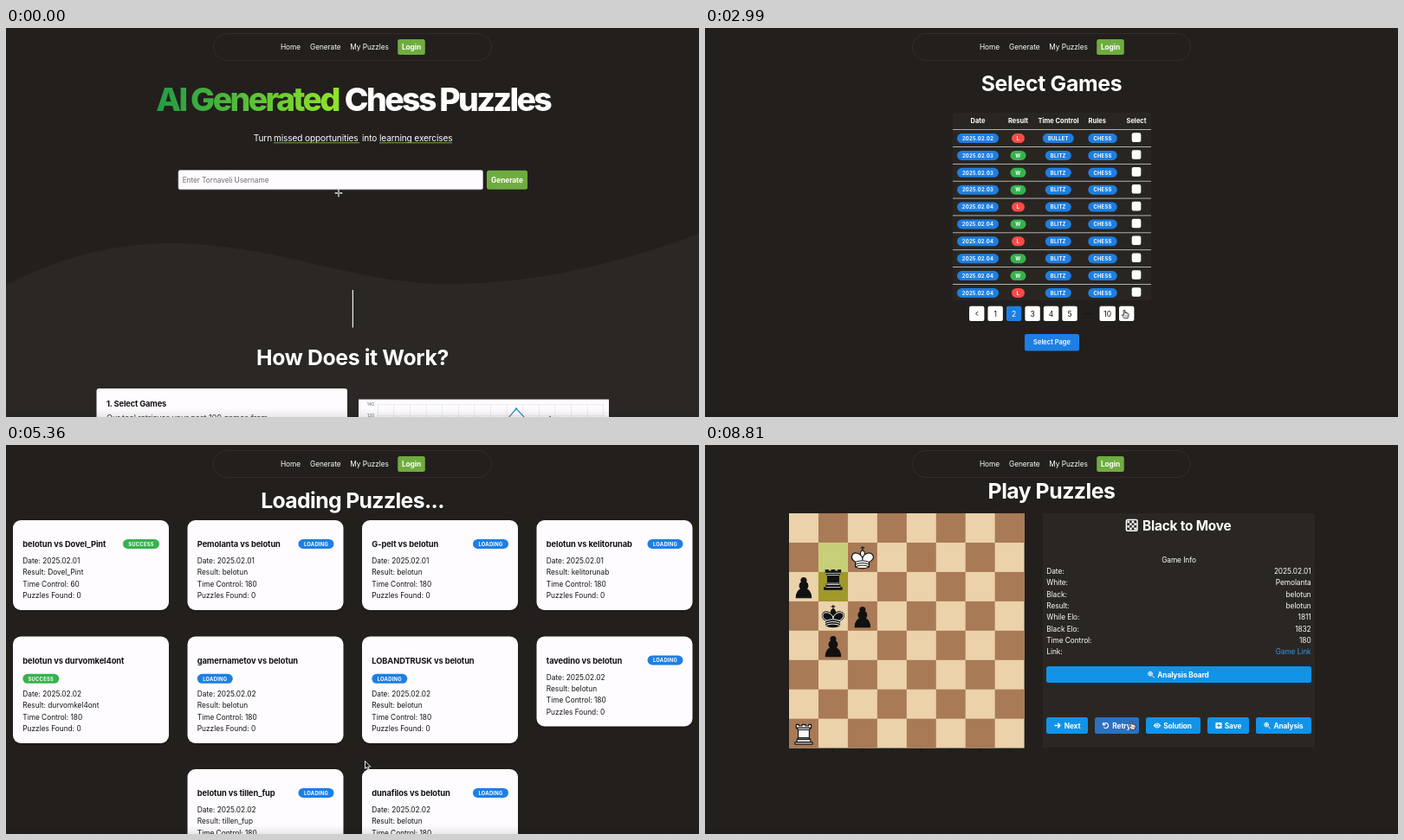
An HTML page for the animation above (8840 ms loop, 800 by 450 pixels).

```html
<!DOCTYPE html>
<html lang="en">
<head>
<meta charset="utf-8">
<title>Chess puzzle generator</title>
<style>
html,body{margin:0;width:100%;height:100%;overflow:hidden;background:#221f1d}
svg{display:block;width:800px;height:450px;font-family:Inter,"Open Sans",sans-serif}
text{white-space:pre}
</style>
</head>
<body>
<svg viewBox="0 0 800 450">
  <defs>
    <linearGradient id="lime"><stop stop-color="#219b45"/><stop offset="1" stop-color="#90e52b"/></linearGradient>
    <linearGradient id="teal" x2="1" y2=".4"><stop offset=".1" stop-color="#1d7fe3"/><stop offset="1" stop-color="#62a3ae"/></linearGradient>
    <linearGradient id="fade" x2="0" y2="1"><stop stop-opacity="0"/><stop offset="1" stop-opacity=".08"/></linearGradient>
  </defs>
  <rect width="800" height="450" fill="#221f1d"/>
  <g id="scene"></g>
  <g id="nav"></g>
  <rect y="440" width="800" height="10" fill="url(#fade)"/>
  <g id="mouse"></g>
</svg>
<script>
const LOOP = 8840;
const BLUE = '#1d7fe3', GREEN = '#37b24d', RED = '#fa4b4b', GRASS = '#6fac3f', SKY = '#1193e8';
const ME = 'belotun';
const $ = id => document.getElementById(id);
const range = n => [...Array(n).keys()];
const each = (list, fn) => list.map(fn).join('');

const box = (x, y, w, h, fill, r = 0, more = '') =>
  `<rect x="${x}" y="${y}" width="${w}" height="${h}" rx="${r}" fill="${fill}" ${more}/>`;
const stroke = (d, color, width = 1, fill = 'none') =>
  `<path d="${d}" fill="${fill}" stroke="${color}" stroke-width="${width}" stroke-linecap="round" stroke-linejoin="round"/>`;
const put = (x, y, inner, scale = 1) => `<g transform="translate(${x} ${y}) scale(${scale})">${inner}</g>`;
const text = (x, y, s, size = 8.3, fill = '#fff', weight = 400, anchor = 'start', gap = -.06) =>
  `<text x="${x}" y="${y}" font-size="${size}" fill="${fill}" font-weight="${weight}" text-anchor="${anchor}" letter-spacing="${gap}">${s}</text>`;
const mid = (x, y, s, size, fill, weight = 400, gap) => text(x, y, s, size, fill, weight, 'middle', gap);
const badge = (cx, cy, w, s, fill) =>
  box(cx - w / 2, cy - 5.5, w, 11, fill, 5.5) + mid(cx, cy + 2.2, s, 5.8, '#fff', 700, .28);
const heading = (y, s, gap) => mid(400, y, s, 24.8, '#fff', 700, gap);

$('nav').innerHTML =
  box(239.5, 6.5, 321, 31, 'none', 15.5, 'stroke="#34322f" stroke-width=".8"') +
  text(317, 25, 'Home') + text(351, 25, 'Generate') + text(397.3, 25, 'My Puzzles') +
  box(452.2, 13, 31.6, 18, GRASS, 2.5) + mid(468, 25, 'Login', 8.3, '#fff', 700, -.1);

/* landing page */
function home(t) {
  const focus = t > 380;
  const typed = ME.slice(0, Math.max(0, Math.floor((t - 450) / 75)));
  const tagline = (x, s) => text(x, 131, s, 10.1, '#fff', 400, 'start', -.12);
  return `<path d="M0 297C70 262 130 249 190 249C310 249 400 296 510 296C620 296 720 268 800 238V450H0Z" fill="#2a2724"/>` +
    mid(278.5, 95.5, 'AI Generated', 37.4, 'url(#lime)', 800, -2.6) +
    mid(509.5, 95.5, 'Chess Puzzles', 37.4, '#fff', 800, -2.6) +
    tagline(285.8, 'Turn') + tagline(309, 'missed opportunities') +
    tagline(411, 'into') + tagline(431, 'learning exercises') +
    box(309, 132.3, 99, 1, GRASS) + box(431, 132.3, 84, 1, GRASS) +
    box(199, 164.5, 351.5, 22.3, '#fefcff', 2, `stroke="${focus ? '#5aa070' : '#b9bcc4'}" stroke-width="${focus ? 1.1 : .6}"`) +
    (typed ? text(203.7, 178.6, typed, 8.3, '#111') : text(203.7, 178.6, 'Enter Tornaveli Username', 8.3, '#6c6c70')) +
    box(555, 164.7, 47, 22, GRASS, 2.5) + mid(578.5, 178.6, 'Generate', 8.3, '#fff', 700) +
    box(399.8, 303, 1.2, 43.5, '#eee') + heading(390, 'How Does it Work?', -.36) +
    box(104.5, 417, 289.5, 50, '#fefcff', 3) +
    text(116, 438, '1. Select Games', 9.3, '#111', 700, 'start', -.15) +
    text(116, 454, 'Our tool retrieves your past 100 games from', 9.1, '#333') +
    box(407, 429.6, 289, 40, '#fefcff') +
    each(range(15), i => box(429 + i * 18.6, 435, .5, 15, '#d9d9dd')) +
    each([435, 448], y => box(429, y, 261, .5, '#d9d9dd')) +
    text(425, 437, '140', 5, '#666', 400, 'end') + text(425, 450, '120', 5, '#666', 400, 'end') +
    stroke('M579 452L589 440.5L600 452', '#2a8cc8', 1.2) +
    '<circle cx="589" cy="440.5" r="1.2" fill="#2a8cc8"/><circle cx="628" cy="450" r="1.2" fill="#777"/>';
}

/* game table */
const PAGES = [
  { days: '1111222222', results: 'WWLLWWWLWW' },
  { days: '2333444444', results: 'LWWWLWLWWL' }
];
function games(t) {
  const page = t > 2450 && t < 3400 ? 1 : 0, picked = t > 4080;
  const { days, results } = PAGES[page];
  const row = i => {
    const y = 127.6 + i * 19.87, won = results[i] === 'W';
    return box(286, y - 10.4, 229, .8, '#d4d3d1') +
      badge(315, y, 48, '2025.02.0' + days[i], BLUE) +
      badge(361.5, y, won ? 18 : 15, results[i], won ? GREEN : RED) +
      badge(407.8, y, i ? 30 : 36, i ? 'BLITZ' : 'BULLET', BLUE) +
      badge(459, y, 33.5, 'CHESS', BLUE) +
      box(492.7, y - 6.3, 10.6, 10.6, picked ? BLUE : '#fff', 2) +
      (picked ? stroke(`M495.4 ${y - 1}l1.9 1.9l3.5 -3.7`, '#fff', 1.4) : '');
  };
  const key = (x, s, n) => {
    const on = n === page + 1, off = s === '‹' && !page;
    const ink = on ? '#fff' : '#111', w = s === '10' ? 18.5 : 17.4;
    const d = s === '‹' ? 'M1 -2l-2 2l2 2' : 'M-1 -2l2 2l-2 2';
    return box(x - w / 2, 321.8, w, 17.2, on ? BLUE : off ? '#696867' : '#fff', 2) +
      (n ? mid(x, 333.5, s, 8.5, ink) : put(x, 330.4, stroke(d, ink, 1)));
  };
  const shift = picked ? -30.7 : 0;
  return heading(73, 'Select Games', -.3) + box(286, 98, 229, 217, '#292622', 2) +
    each([[315, 'Date'], [361.5, 'Result'], [408, 'Time Control'], [452.7, 'Rules'], [498, 'Select']],
      ([x, s]) => mid(x, 110.2, s, 7.5, '#fff', 700, 0)) +
    each(range(10), row) +
    each(['‹', '1', '2', '3', '4', '5'], (s, i) => key(313.7 + i * 21.47, s, i)) +
    each([438.7, 442.3, 445.9], x => `<circle cx="${x}" cy="330.4" r=".8" fill="#0c0b0a"/>`) +
    key(464.7, '10', 10) + key(486.7, '›', 0) +
    box(369 + shift, 354, 63, 19.5, BLUE, 2) + mid(400.5 + shift, 366.4, 'Select Page', 7.5, '#fff', 600, 0) +
    (picked ? box(414, 354, 48.3, 19.5, 'url(#teal)', 2) + mid(438.2, 366.4, 'Analyze', 7.5, '#fff', 600, 0) : '');
}

/* loading cards: opponent, column, top, plays first, speed, done at, found, winner is me */
const CARDS = [
  ['Dovel_Pint', 0, 87, 1, 60, 5100, 0, 0],
  ['Pemolanta', 1, 87, 0, 180, 5900, 1, 1],
  ['G-pelt', 2, 87, 0, 180, 5600, 0, 1],
  ['kelitorunab', 3, 87, 1, 180, 6500, 2, 0],
  ['durvomkel4ont', 0, 221.5, 1, 180, 5250, 0, 0],
  ['gamernametov', 1, 221.5, 0, 180, 5750, 0, 1],
  ['LOBANDTRUSK', 2, 221.5, 0, 180, 6000, 0, 1],
  ['tavedino', 3, 221.5, 0, 180, 6250, 0, 1],
  ['tillen_fup', 1, 375, 1, 180, 7000, 0, 0],
  ['dunafilos', 2, 375, 0, 180, 6330, 0, 1]
];
function loading(t) {
  return heading(73, 'Loading Puzzles...', -.65) + each(CARDS, ([name, col, y, first, speed, done, found, won], i) => {
    const x = 8 + col * 201.5, wrap = i > 3 && i < 7, ok = t > done;
    const w = ok ? 42 : 41, drop = wrap ? 19.5 : 0;
    const lines = ['Date: 2025.02.0' + (i < 4 ? 1 : 2), 'Result: ' + (won ? ME : name),
      'Time Control: ' + speed, 'Puzzles Found: ' + (ok ? found : 0)];
    return box(x - .5, y + 2, 181, 104 + drop, '#191715', 9, 'opacity=".5"') +
      box(x, y, 180, 104 + drop, '#fefcff', 9) +
      text(x + 11.3, y + 31, first ? `${ME} vs ${name}` : `${name} vs ${ME}`, 9.3, '#111', 700, 'start', -.1) +
      badge(wrap ? x + 11.3 + w / 2 : x + 169 - w / 2, y + (wrap ? 48.8 : 27.4), w, ok ? 'SUCCESS' : 'LOADING', ok ? GREEN : BLUE) +
      each(lines, (s, n) => text(x + 11.3, y + 50 + drop + n * 13.35, s, 8.3, '#111', 400, 'start', 0));
  });
}

/* chess pieces on a 45 unit square */
const FOOT = 'M11.5 30c5.5-3 15.5-3 21 0m-21 3.5c5.5-3 15.5-3 21 0m-21 3.5c5.5-3 15.5-3 21 0';
const INK = '#111', PAPER = '#fcfaf8';
const pawn = stroke('M22.5 9c-2.2 0-4 1.8-4 4 0 .9.3 1.7.8 2.4C17.3 16.5 16 18.6 16 21c0 2 .9 3.8 2.4 5C15.4 27 11 31.6 11 39.5h23c0-7.9-4.4-12.5-7.4-13.5 1.5-1.2 2.4-3 2.4-5 0-2.4-1.3-4.5-3.3-5.6.5-.7.8-1.5.8-2.4 0-2.2-1.8-4-4-4z', INK, 1.5, INK);
const rook = (fill, line) =>
  stroke('M9 39h27v-3H9zM12 36v-4h21v4zM12.5 32l1.5-2.5h17l1.5 2.5zM14 29.5V17h17v12.5zM14 17l-3-3h23l-3 3zM11 14V9h4v2h5V9h5v2h5V9h4v5z', INK, 1.5, fill) +
  stroke('M12 35.5h21M13 31.5h19M14 29.5h17M14 17h17M11 14h23', line, 1);
const king = (fill, line) =>
  stroke('M22.5 11.6V6M20 8h5', INK, 1.5) +
  stroke('M22.5 25s4.5-7.5 3-10.5c0 0-1-2.5-3-2.5s-3 2.5-3 2.5c-1.5 3 3 10.5 3 10.5', INK, 1.5, fill) +
  stroke('M11.5 37c5.5 3.5 15.5 3.5 21 0v-7s9-4.5 6-10.5c-4-6.5-13.5-3.5-16 4V27v-3.5c-3.5-7.5-13-10.5-16-4-3 6 5 10 5 10z', INK, 1.5, fill) +
  stroke(FOOT + (fill === INK ? 'M32 29.5s8.5-4 6-9.6C34.2 14 25 18 22.5 24.5v2.1v-2.1C20 18 10 14 7 19.9c-2.5 5.6 4.9 9 4.9 9' : ''), line, 1.3);

const CELL = 33.95, BX = 97, BY = 79;
const on = (c, r, art) => put(BX + c * CELL, BY + r * CELL, art, CELL / 45);
const ramp = (t, a, b) => Math.min(1, Math.max(0, (t - a) / (b - a)));

const lens = stroke('M1.2 1.2L3.4 3.4M1.5 -.9A2.4 2.4 0 1 1 -3.3 -.9A2.4 2.4 0 1 1 1.5 -.9M-2.1 -.9h2.4M-.9 -2.1v2.4', '#fff', 1);
const icons = {
  Next: stroke('M-3 0h6M.6 -2.5L3 0L.6 2.5', '#fff', 1.3),
  Retry: stroke('M-3 -3v2.4h2.4M-2.8 -.8A3 3 0 1 1 -1.8 2.4', '#fff', 1.2),
  Solution: '<path d="M-4.3 0Q0 -6 4.3 0Q0 6 -4.3 0Z" fill="#fff"/><circle r="1.7" fill="none" stroke="#1193e8" stroke-width=".9"/>',
  Save: box(-3.6, -3.6, 7.2, 7.2, '#fff', 1) + stroke('M-1.8 0h3.6M0 -1.8v3.6', SKY, 1.1),
  Analysis: lens
};
const BUTTONS = [['Next', 394, 48, 407, 424], ['Retry', 450, 51, 462.5, 481], ['Solution', 509, 63, 522, 545.5],
  ['Save', 580, 48, 593, 609.5], ['Analysis', 636, 64, 649, 673.5]];
const INFO = [['Date:', '2025.02.01'], ['White:', 'Pemolanta'], ['Black:', ME], ['Result:', ME],
  ['While Elo:', '1811'], ['Black Elo:', '1832'], ['Time Control:', '180'], ['Link:', 'Game Link']];

function play(t) {
  const rank = 2 - ramp(t, 7850, 8050) + ramp(t, 8705, 8850);
  const moved = t > 8050;
  return heading(62, 'Play Puzzles', -.5) +
    box(BX, BY, CELL * 8, CELL * 8, '#ebd2aa') +
    each(range(64), i => {
      const c = i % 8, r = i >> 3;
      return (c + r) % 2 ? box(BX + c * CELL, BY + r * CELL, CELL, CELL, '#a97a56') : '';
    }) +
    (moved ? box(BX + CELL, BY + CELL, CELL, CELL, '#c8cf79') + box(BX + CELL, BY + 2 * CELL, CELL, CELL, '#a09829') : '') +
    each([...'ABCDEFGH'], (s, i) => mid(BX + (i + .5) * CELL, 355, s, 4.5, '#151412') +
      mid(372, BY + (i + .5) * CELL + 2, 8 - i, 4.5, '#191816')) +
    on(2, 1, king(PAPER, INK)) + on(0, 2, pawn) + on(1, 3, king(INK, '#fff')) + on(2, 3, pawn) +
    on(1, 4, pawn) + on(0, 7, rook(PAPER, INK)) + on(1, rank, rook(INK, '#fff')) +
    box(390, 79, 314, 271, '#2a2723') +
    box(486.4, 86.6, 12.6, 12.6, 'none', 1.5, 'stroke="#fff" stroke-width="1.5"') +
    each(range(16), i => (i + (i >> 2)) % 2 ? '' : box(487.5 + i % 4 * 2.6, 87.7 + (i >> 2) * 2.6, 2.6, 2.6, '#fff')) +
    text(505, 98.7, 'Black to Move', 15.4, '#fff', 700, 'start', -.2) +
    mid(547, 135.7, 'Game Info', 8.3, '#fff') +
    each(INFO, ([a, b], i) => text(394.3, 149.1 + i * 13.3, a) +
      text(699.6, 149.1 + i * 13.3, b, 8.3, i === 7 ? '#3597e6' : '#fff', 400, 'end')) +
    box(394, 256, 306, 19, SKY, 2.5) + put(515, 265.6, lens) + mid(552, 268.6, 'Analysis Board', 8.3, '#fff', 700, -.1) +
    each(BUTTONS, ([s, x, w, ix, tx]) =>
      box(x, 315, w, 19, s === 'Retry' && t > 8500 ? '#2a72c0' : SKY, 2.5) +
      put(ix, 324.5, icons[s]) + mid(tx, 327.5, s, 8.3, '#fff', 700, -.1));
}

/* pointer */
const POINTERS = {
  cross: stroke('M-3.5 0h7M0 -3.5v7', '#ddd', 1.8) + stroke('M-3.2 0h6.4M0 -3.2v6.4', '#55534f', .7),
  beam: stroke('M0 -4v8M-1.5 -4.5L0 -4L1.5 -4.5M-1.5 4.5L0 4L1.5 4.5', '#222', .8),
  hand: stroke('M-.8 .6Q0 -.6 .8 .6V3.6Q1.7 3 2.4 3.9Q3.2 3.4 3.8 4.3Q4.8 4 5 5.2V7Q4.8 8.6 4 9.8H-.1Q-1.4 8 -2.6 6Q-2.4 4.8 -.8 6Z', '#111', .8, '#fff') + stroke('M.9 6.3v1.8M2.3 6.3v1.8M3.6 6.3v1.8', '#222', .4),
  arrow: stroke('M0 0V8.3L1.9 6.6L3.2 9.6L4.6 9L3.3 6.1H5.9Z', '#fff', .9, '#111')
};
const PATH = [
  [0, 384, 191, 'cross'], [150, 384, 191, 'cross'], [350, 374, 176, 'beam'], [900, 374, 176, 'beam'],
  [1330, 592, 179, 'hand'], [1600, 592, 179, 'arrow'], [1880, 592, 179, 'arrow'], [2330, 484, 326, 'hand'],
  [3050, 484, 326, 'arrow'], [3330, 313, 328, 'hand'], [3500, 313, 328, 'arrow'], [3950, 394, 362, 'hand'],
  [4150, 394, 362, 'hand'], [4400, 401.5, 358.5, 'arrow'], [4510, 401.5, 358.5, 'arrow'], [4700, 418, 363, 'hand'],
  [4850, 418, 363, 'arrow'], [5050, 414.5, 366, 'arrow'], [7330, 414.5, 366, 'arrow'], [7750, 147, 163, 'hand'],
  [7850, 147, 163, 'hand'], [8050, 147, 129, 'hand'], [8150, 147, 129, 'arrow'], [8580, 492, 319.5, 'hand'],
  [LOOP, 492, 319.5, 'hand']
];
function pointer(t) {
  const i = PATH.findIndex(p => p[0] > t) - 1;
  const [t0, x0, y0, kind] = PATH[i], [t1, x1, y1] = PATH[i + 1];
  const k = (t - t0) / (t1 - t0), e = k * k * (3 - 2 * k);
  return put(x0 + (x1 - x0) * e, y0 + (y1 - y0) * e, POINTERS[kind]);
}

const SCENES = [[1600, home], [4850, games], [7100, loading], [LOOP, play]];
const shown = {};
function show(id, markup) {
  if (shown[id] !== markup) $(id).innerHTML = shown[id] = markup;
}
const start = performance.now();
function tick() {
  const t = Math.max(0, performance.now() - start) % LOOP;
  show('scene', SCENES.find(s => t < s[0])[1](t));
  show('mouse', pointer(t));
  requestAnimationFrame(tick);
}
tick();
</script>
</body>
</html>
```
